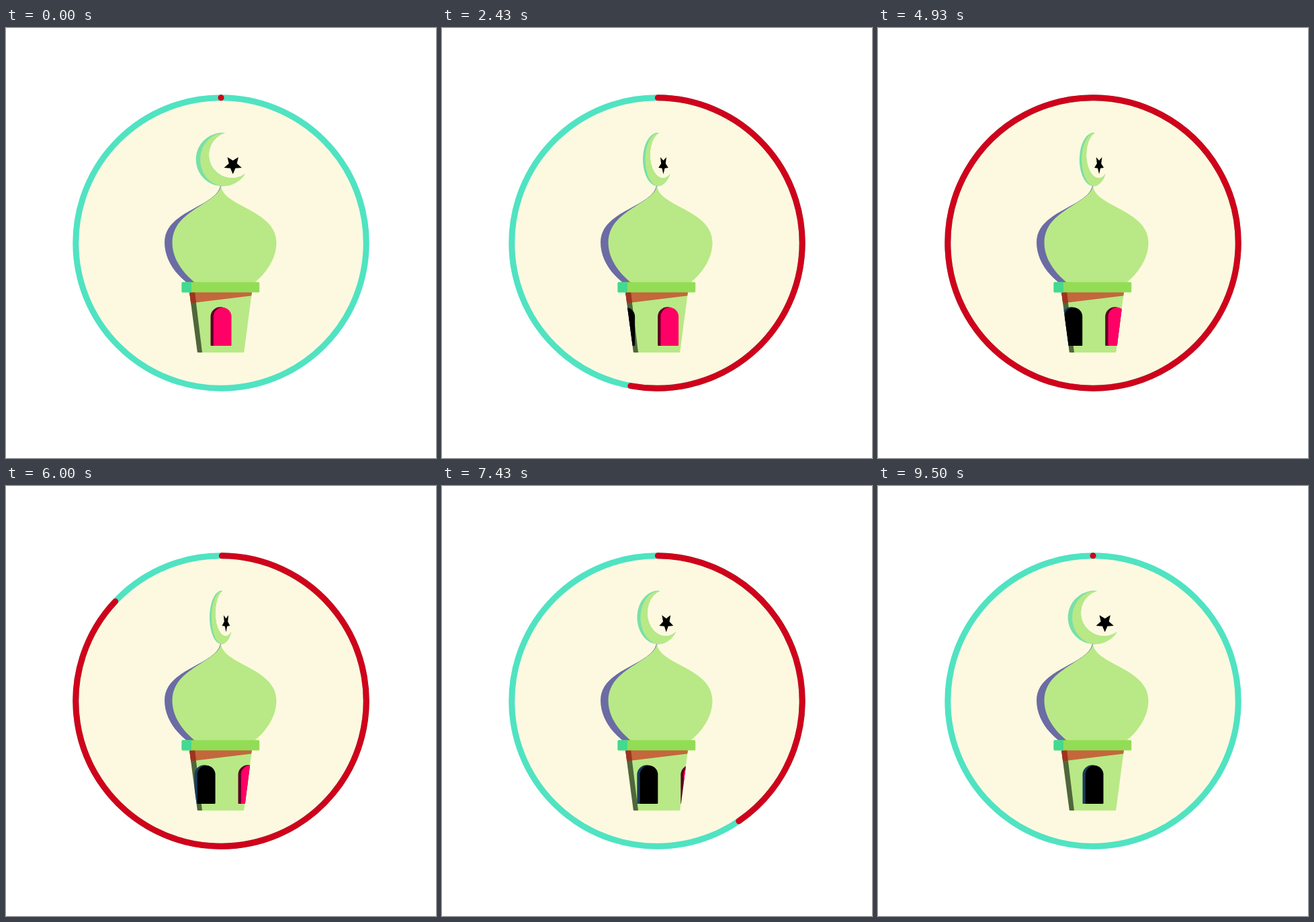
Recreate the animation shown at these times as an HTML page. Size 640 by 640 pixels, loop 9570 ms.

```html
<!DOCTYPE html>
<html lang="en">
<head>
<meta charset="utf-8">
<title>Minaret</title>
<style>
  html, body { margin: 0; width: 100%; height: 100%; overflow: hidden; background: #fff; }
  svg { display: block; width: 100%; height: 100%; }
</style>
</head>
<body>
<svg viewBox="0 0 640 640">
  <defs>
    <clipPath id="wall"><path d="M273 393H366L354.5 483H285Z"/></clipPath>
  </defs>
  <circle cx="320" cy="320" r="216.2" fill="#fdf9e0" stroke="#50e3c2" stroke-width="9"/>
  <path id="arc" fill="none" stroke="#d0021b" stroke-width="9" stroke-linecap="round"/>

  <g id="moon">
    <path fill="#78e0a8" d="M326 156A39.8 39.8 0 1 0 356 217A34.4 34.4 0 1 1 326 156Z"/>
    <path fill="#b8e986" d="M326 156A36.4 39.8 0 0 0 321 235.3A39.8 39.8 0 0 0 356 217A34.4 34.4 0 1 1 326 156Z"/>
    <path id="star"/>
  </g>

  <path fill="#6b6ba5" d="M319 235C313 266 236 272 236 319C236 343 250 364 269 379H285L320 235Z"/>
  <path fill="#b8e986" d="M320 235C323 266 402.5 271 402.5 319C402.5 343 388 364 370 379H281C262 363 247.5 343 247.5 319C247.5 271 315 262 320 235Z"/>

  <path fill="#b8e986" d="M273 393H366L354.3 482Q354 483 353 483H286Q285 483 284.8 482Z"/>
  <path fill="#c4673c" d="M273 393H366L365.3 398.5L275.2 409.5Z"/>
  <path fill="#50663c" d="M273 393H281L292 483H286Q285 483 284.8 482Z"/>
  <path fill="#a0331f" d="M273 393H281L282.9 408.5L275.2 409.5Z"/>

  <g clip-path="url(#wall)">
    <g id="pinkDoor"><path fill="#5c0024"/><path fill="#ff0066"/></g>
    <g id="blackDoor"><path fill="#1a3a5c"/><path/></g>
  </g>

  <rect x="261.5" y="378.3" width="115.7" height="15.2" rx="1.5" fill="#92dd55"/>
  <path fill="#43d991" d="M276 378.3V393.5H263Q261.5 393.5 261.5 392V379.8Q261.5 378.3 263 378.3Z"/>
</svg>
<script>
const $ = id => document.getElementById(id);
const LOOP = 9570, END = 9500, PEAK = 4827, FPS = 14, TAU = 2 * Math.PI;

// Cubic Bezier easing with control points (p, 0) and (q, 1).
function ease(x, p = 0.42, q = 0.58) {
  if (x <= 0 || x >= 1) return x <= 0 ? 0 : 1;
  let lo = 0, hi = 1, s = 0.5;
  for (let i = 0; i < 24; i++) {
    s = (lo + hi) / 2;
    const at = 3 * (1 - s) ** 2 * s * p + 3 * (1 - s) * s * s * q + s ** 3;
    if (at < x) lo = s; else hi = s;
  }
  return s * s * (3 - 2 * s);
}

const progress = t => t < PEAK
  ? ease(t / PEAK, 0.4165, 0.548)
  : 1 - ease((t - PEAK) / (END + 9 - PEAK));

// Horizontal squeeze of the moon: [time, scale]
const squeeze = [[500, 1], [3000, 0.5], [4300, 0.65], [5530, 0.42], [8810, 1]];
function moonScale(t) {
  let value = 1;
  for (let i = 1; i < squeeze.length; i++) {
    const [t0, a] = squeeze[i - 1], [t1, b] = squeeze[i];
    if (t >= t0) value = a + (b - a) * ease((t - t0) / (t1 - t0));
  }
  return value;
}

const onRing = f => {
  const a = f * TAU;
  return `${320 + 216.2 * Math.sin(a)} ${320 - 216.2 * Math.cos(a)}`;
};

function arcPath(f) {
  const start = Math.min(f, 0.001), end = Math.min(Math.max(f, start + 0.0001), 0.9999);
  return `M${onRing(start)}A216.2 216.2 0 ${end - start > 0.5 ? 1 : 0} 1 ${onRing(end)}`;
}

const doorway = (left, right, top) => {
  const r = (right - left) / 2;
  return `M${left} ${top + r}A${r} ${r} 0 0 1 ${right} ${top + r}V472Q${right} 473 ${right - 1} 473H${left + 1}Q${left} 473 ${left} 472Z`;
};

for (const id of ["pinkDoor", "blackDoor"]) {
  const [shade, front] = $(id).children;
  shade.setAttribute("d", doorway(304.5, 333.5, 415.2));
  front.setAttribute("d", doorway(308.8, 335.5, 416));
}

$("star").setAttribute("d", "M" + Array.from({ length: 10 }, (_, i) => {
  const a = TAU * (0.25 + i / 10), r = i % 2 ? 6.3 : 13.9;
  return `${337.7 + r * Math.cos(a)} ${203.6 + r * Math.sin(a)}`;
}).join("L") + "Z");

function draw(now) {
  const t = Math.floor((now % LOOP + 5) * FPS / 1000) * 1000 / FPS;
  const slide = 65 * t / END;
  $("arc").setAttribute("d", arcPath(progress(t)));
  $("moon").setAttribute("transform", `translate(319.3) scale(${moonScale(t)} 1) translate(-319.3)`);
  $("pinkDoor").setAttribute("transform", `translate(${slide})`);
  $("blackDoor").setAttribute("transform", `translate(${slide - 65})`);
}

const begin = performance.now();
(function tick() {
  draw(performance.now() - begin);
  requestAnimationFrame(tick);
})();
</script>
</body>
</html>
```
